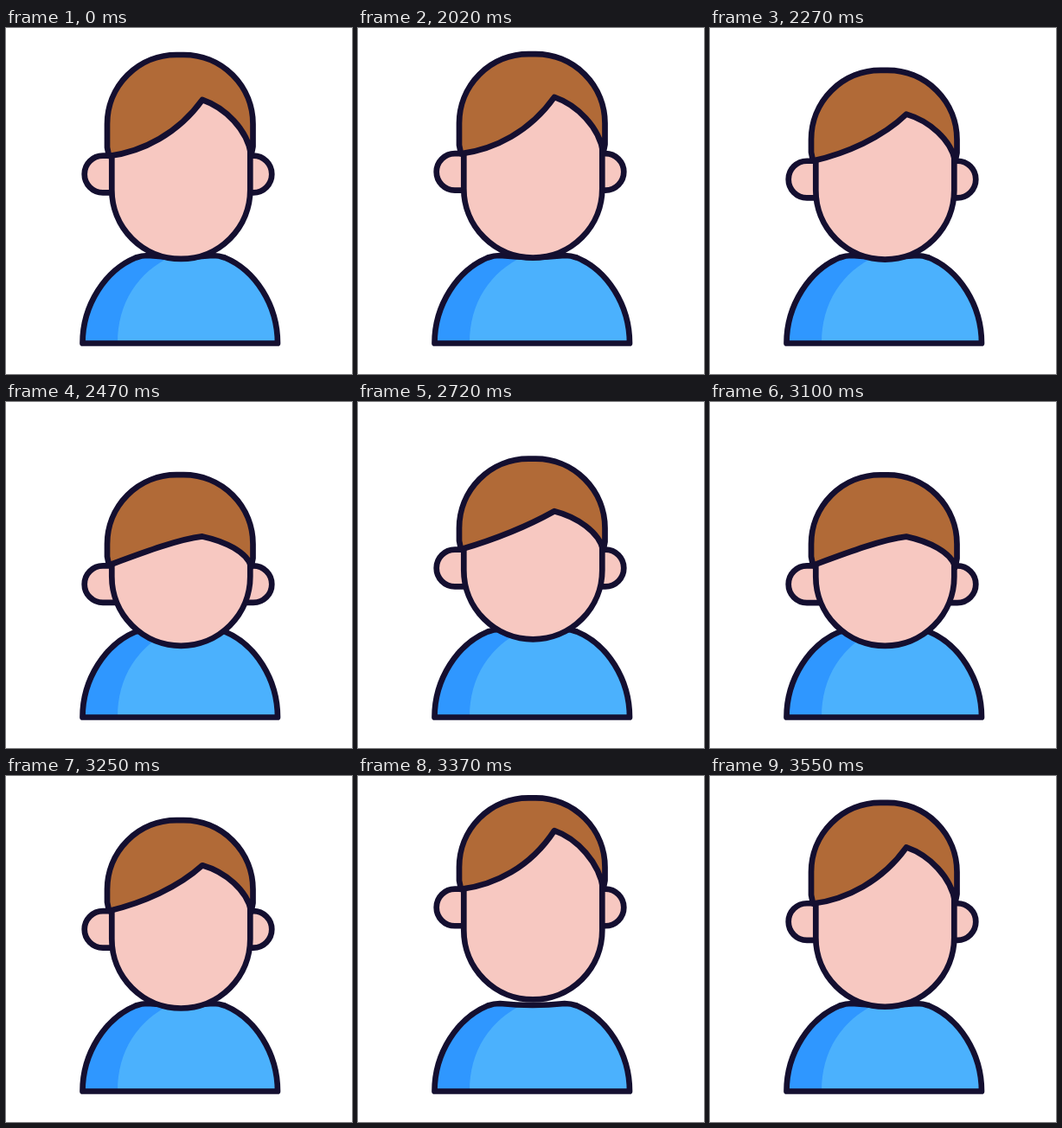
An HTML page that plays this animation: 400x400 px, repeating every 3.57 s.

```html
<!DOCTYPE html>
<html lang="en">
<head>
<meta charset="utf-8">
<title>Nodding avatar</title>
<style>
  html, body { margin: 0; width: 100%; height: 100%; overflow: hidden; background: #fff; }
  svg { display: block; width: 100%; height: 100%; }
  .line { stroke: #140f30; stroke-width: 6.7; stroke-linejoin: round; stroke-linecap: round; }
  .skin { fill: #f7c8c1; }
  .hair { fill: #b16a37; }
</style>
</head>
<body>
<svg viewBox="0 0 400 400">
  <defs>
    <path id="shirt" d="M88.5 364.5C88.5 320 115 280 150 265.5Q157 263 164 263Q202 267 239 263Q246 263 253 265.5C288 280 314 320 314 364.5Z"/>
  </defs>
  <use href="#shirt" fill="#4bb1fd"/>
  <path fill="#2f97ff" d="M88.5 364.5C88.5 320 115 280 150 265.5Q157 263 164 263H193C152 282 129 318 129 364.5Z"/>
  <use href="#shirt" class="line" fill="none"/>
  <path id="ears" class="line skin"/>
  <path id="face" class="line skin"/>
  <path id="hair" class="line hair"/>
</svg>
<script>
const LOOP = 3570, START = 2020, STEP = 25;

// Heights of the moving points in each pose; l/r are hairline controls.
const rest = { top: 31, tip: 83, ear: 169, chin: 267, left: 148, l1: 143, l2: 122, r1: 92, r2: 117, right: 147 };
const high = { top: 25, tip: 62, ear: 151, chin: 258, left: 130, l1: 125, l2: 105, r1: 71, r2: 99, right: 130 };
const low = { top: 84.5, tip: 156, ear: 211, chin: 282, left: 189, l1: 174.5, l2: 159, r1: 161.5, r2: 174, right: 191 };

const mix = (a, b, k) =>
  Object.fromEntries(Object.keys(a).map(n => [n, a[n] + (b[n] - a[n]) * k]));

const keys = [
  [2000, rest], [2135, high], [2472, low], [2785, mix(low, high, 0.4)],
  [3098, low], [3360, high], [3550, rest]
];

function poseAt(t) {
  if (t < START) return rest;
  t = START + Math.floor((t - START) / STEP) * STEP;
  const i = keys.findIndex(k => k[0] > t);
  if (i < 0) return rest;
  const [t0, a] = keys[i - 1], [t1, b] = keys[i];
  return mix(a, b, (t - t0) / (t1 - t0));
}

const [ears, face, hair] = ['ears', 'face', 'hair'].map(id => document.getElementById(id));

function draw(p) {
  const jaw = p.chin - 80, temple = p.left - 15, brow = p.tip - 5, crown = p.top + 80;
  ears.setAttribute('d',
    `M140 ${p.ear - 21.3}H112a21.3 21.3 0 0 0 0 42.6H140Z` +
    `M265 ${p.ear - 21.3}H286a21.3 21.3 0 0 1 0 42.6H265Z`);
  face.setAttribute('d',
    `M122.3 ${temple}V${jaw}A80 80 0 0 0 282.3 ${jaw}V${temple}` +
    `Q282.3 ${brow} 227 ${brow}Z`);
  hair.setAttribute('d',
    `M119 ${p.left}L117 ${p.left - 10}V${crown}A80 80 0 0 1 197 ${p.top}H205.5` +
    `A80 80 0 0 1 285.5 ${crown}V${p.right - 10}L283.5 ${p.right}` +
    `C279 ${p.r2} 253 ${p.r1} 227 ${p.tip}` +
    `C199 ${p.l2} 158 ${p.l1} 119 ${p.left}Z`);
}

function tick() {
  draw(poseAt(performance.now() % LOOP));
  requestAnimationFrame(tick);
}
tick();
</script>
</body>
</html>
```
